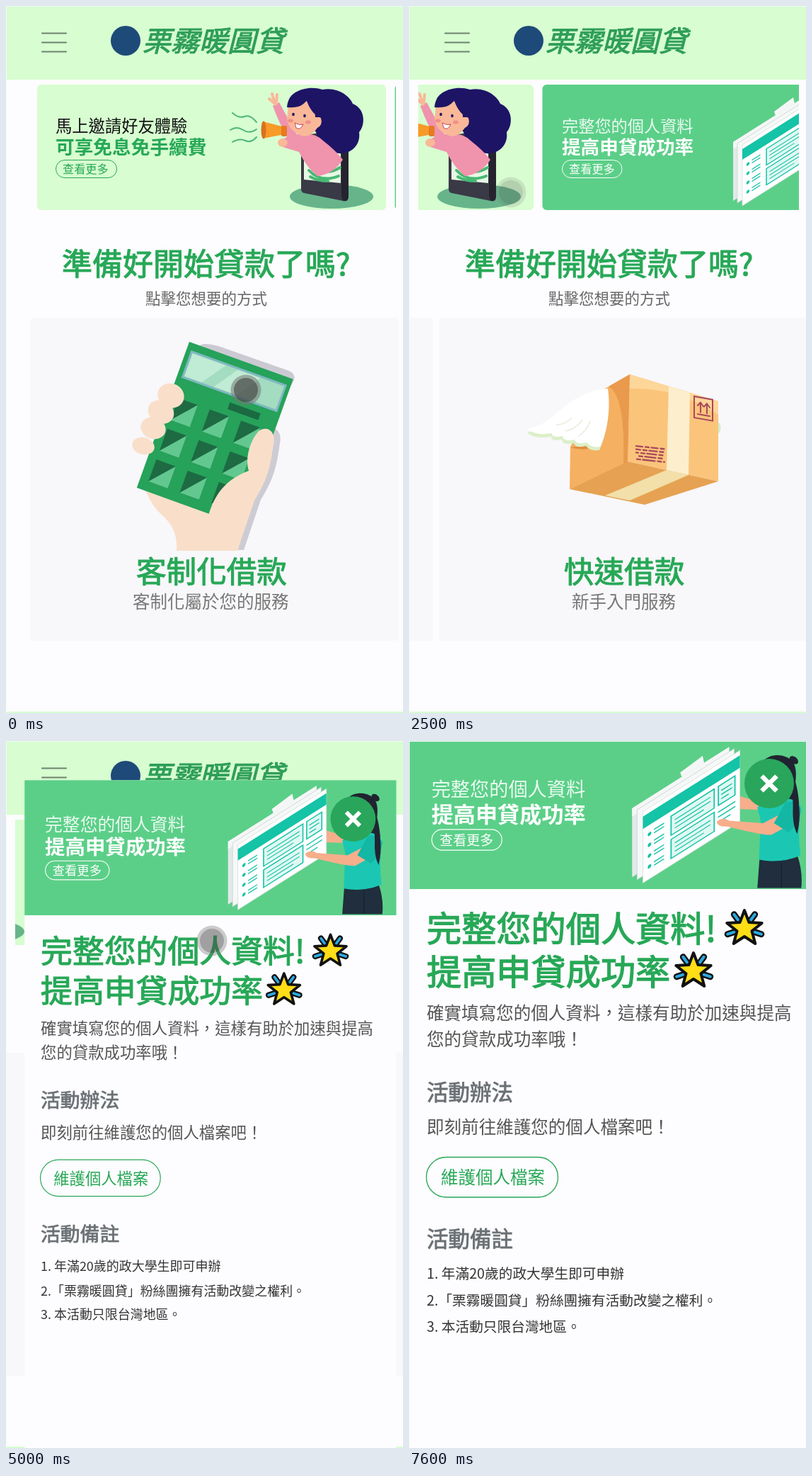
An HTML page that plays this animation: 561 by 998 pixels, repeating every 7700 ms.

```html
<!DOCTYPE html>
<html lang="zh-Hant">
<head>
<meta charset="utf-8">
<style>
html, body { margin: 0; width: 100%; height: 100%; overflow: hidden; background: #fdfcfe; }
svg { display: block; width: 100%; height: 100%; }
text { font-family: "Noto Sans CJK TC", "Noto Sans CJK", "Noto Sans", sans-serif; white-space: pre; }
</style>
</head>
<body>
<svg id="stage" viewBox="0 0 561 998" fill="none"></svg>
<script>
const GREEN = '#27a857', MINT = '#d7fdd0', PAGE = '#fdfcfe', CARD = '#f8f7fa', SKIN = '#f9dfc9';

// Text placed by its left edge and the vertical middle of its em box.
const text = (x, cy, size, str, fill, weight = 400, more = '') =>
  `<text x="${x}" y="${cy + size * 0.38}" font-size="${size}" fill="${fill}" font-weight="${weight}" ${more}>${str}</text>`;
// Medium weight: regular glyphs thickened by a thin outline.
const medium = (x, cy, size, str, fill, more = '') =>
  text(x, cy, size, str, fill, 400, `stroke="${fill}" stroke-width="${size * 0.027}" ${more}`);
const rect = (x, y, w, h, fill, more = '') =>
  `<rect x="${x}" y="${y}" width="${w}" height="${h}" fill="${fill}" ${more}/>`;
const path = (d, fill, more = '') => `<path d="${d}" fill="${fill}" ${more}/>`;
const line = (d, stroke, width, more = '') =>
  `<path d="${d}" stroke="${stroke}" stroke-width="${width}" stroke-linecap="round" stroke-linejoin="round" ${more}/>`;
const oval = (x, y, rx, ry, fill, more = '') =>
  `<ellipse cx="${x}" cy="${y}" rx="${rx}" ry="${ry}" fill="${fill}" ${more}/>`;
const group = (attrs, ...parts) => `<g ${attrs}>${parts.join('')}</g>`;
const repeat = (n, fn) => Array.from({ length: n }, (_, i) => fn(i)).join('');

function inviteBanner() {
  const hair = '#1d1466', face = '#f9b898', pink = '#f093ad';
  return [
    rect(44, 111, 493, 177, MINT, 'rx="6"'),
    text(70, 169, 23.3, '馬上邀請好友體驗', '#111'),
    text(70, 199, 26.7, '可享免息免手續費', GREEN, 700),
    rect(70.5, 217.5, 86, 25, 'none', `rx="12.5" stroke="${GREEN}"`),
    text(80, 230, 16.2, '查看更多', GREEN),
    line('M320 151q9 8 17 5t17 8M317 175q9-6 18 0t19-1M320 192q10-6 18-2t16-5', '#4fb67c', 2),
    oval(460, 269, 59, 17, '#67b48b'),
    path('M417 188Q417 184 421 183L478 172Q484 171 484 178V268Q484 277 476 275L421 264Q417 263 417 258Z', '#3a3946'),
    path('M478 172Q484 171 484 178V268Q484 277 476 275L474 268V176Z', '#25242e'),
    path('M421 190L473 182V250L421 245Z', '#e6f9e4'),
    line('M428 232Q445 250 470 240M432 222Q450 242 472 228M430 241Q440 247 455 247', '#48b873', 4),
    path('M399 138C398 122 425 111 447 118C470 114 486 128 490 138C508 145 508 168 499 178C502 200 482 212 465 207C452 202 442 192 438 178L410 145Z', hair),
    path('M402 182L421 180Q438 180 448 190Q466 204 476 217Q462 238 440 240Q425 228 414 206L391 199L388 190Z', pink),
    path('M377 141L386 136Q395 152 404 170L414 186L402 194Q386 166 377 141Z', pink),
    line('M380 138L372 131M380 137L376 124M382 136L383 125M381 139L379 134', face, 4),
    path('M399 140Q414 143 425 134Q432 153 445 158Q448 168 440 172Q432 184 421 184Q400 178 397 160Z', face),
    path('M397 143Q419 145 425 132Q437 140 437 157L447 157L440 125L414 120Q398 127 397 143Z', hair),
    oval(406, 153, 1.8, 2.2, hair), oval(422, 155, 1.8, 2.2, hair),
    oval(402, 162, 4, 2.5, '#ef8f86'), oval(427, 164, 4, 2.5, '#ef8f86'),
    path('M408 165Q415 169 420 167Q416 176 410 172Z', '#fff', 'stroke="#c8405a"'),
    path('M363 163L394 171V181L363 187Z', '#f79a28'),
    oval(364, 175, 3.5, 12.5, '#d9701e'),
    rect(389, 169, 8, 15, '#e67b20', 'rx="2"'),
    oval(391, 193, 7, 6, face)
  ].join('');
}

function profileArt() {
  const teal = '#15c3a7', skin = '#f6ae8b', dark = '#202431';
  const page = (x, y) => `transform="matrix(1 -.63 0 1 ${x} ${y})"`;
  const frame = `stroke="${teal}" stroke-width="1.5"`;
  return [
    text(84, 169, 23.2, '完整您的個人資料', '#eafaf0', 300),
    text(84, 199, 26.6, '提高申貸成功率', '#fff', 700),
    rect(84.5, 217.5, 84.5, 25, 'none', 'rx="12.5" stroke="#fff"'),
    text(94, 230, 16.2, '查看更多', '#fff'),
    path('M479 150C478 133 495 124 511 130C522 134 525 143 523 160Q531 190 525 223Q514 219 510 193L492 181Z', dark),
    oval(521, 134, 6, 4, dark, 'transform="rotate(40 521 134)"'),
    path('M451 176L475 183L481 194L453 193Z', skin),
    path('M384 149L411 129L413 138L386 155Z', '#f4f7f6'),
    group(page(326, 192), rect(0, 0, 117, 83, '#e3e9e9'), rect(0, 0, 117, 10, '#f4f7f6')),
    group(page(332, 194), rect(0, 0, 117, 84, '#f6f8f8', 'stroke="#c9d5d3" stroke-width=".7"')),
    group(page(339, 196),
      rect(0, 0, 117, 86, '#fff', 'stroke="#d5dfdd" stroke-width=".7"'),
      rect(0, 6, 117, 15, teal),
      repeat(4, i => oval(8, 32 + i * 13, 2.2, 2.2, teal) +
        line(`M14 ${30 + i * 13}h11M14 ${34 + i * 13}h11`, teal, 1.4)),
      repeat(2, i => rect(34, 27 + i * 28, 52, 23, '#dff8f2', frame) +
        line(`M39 ${34 + i * 28}h42M39 ${39 + i * 28}h42M39 ${44 + i * 28}h34`, teal, 1.2)),
      rect(91, 27, 20, 23, '#dff8f2', frame),
      line('M95 34h12M95 39h12M95 44h8M91 58h20M91 64h20M91 70h14', teal, 1.4)),
    path('M477 288L480 248H525Q532 268 530 288Z', '#202e3d'),
    line('M506 258V287', '#14202c', 1),
    path('M477 191Q490 178 510 180Q527 181 530 193Q525 218 529 249Q505 259 479 254L481 207Z', '#1bc7b3'),
    path('M484 164H501L507 181Q497 188 487 182Z', '#e99b79'),
    path('M481 147Q494 148 500 139Q512 145 509 161Q505 176 491 174Q480 170 481 147Z', skin),
    path('M482 147Q497 151 502 139L512 154L508 174L516 180L518 145L500 130Z', dark),
    line('M484 153h3M494 154h4M486 167q4-2 6 0', dark, 1.3),
    oval(497, 162, 3, 2, '#ee8f7d'),
    path('M428 208Q436 202 443 207L484 210L513 195L523 208L494 224Q484 225 441 214Q429 215 428 208Z', skin),
    path('M511 185Q525 181 530 194Q528 209 515 221L497 210Z', '#13b7a4'),
    path('M519 160Q533 190 525 223Q519 212 520 190Z', dark)
  ].join('');
}

function calculatorCard() {
  const thumb = 'M361 600C374 591 386 602 382 618C378 648 374 668 355 698L331 769H246L247 738L290 719C299 690 313 669 347 656C342 641 347 616 361 600Z';
  return [
    rect(34, 440, 521, 456, CARD, 'rx="5"'),
    path('M274 480Q276 474 300 480L400 515Q411 520 406 530L390 560L262 500Z', '#cbcad2'),
    path(thumb, '#cdccd4', 'transform="translate(5 -1)"'),
    path('M197 684Q207 708 224 722Q243 740 241 769H328L340 690L320 650Z', SKIN),
    group('transform="translate(259 474) rotate(19.8)"',
      rect(0, 0, 156, 219, '#26a25a'),
      rect(8, 12, 141, 38, '#a3dcc0', 'stroke="#7fb8c0" stroke-width="3"'),
      path('M10 14H60L36 48H10ZM78 14H112L88 48H54Z', '#c0ebd4'),
      rect(83, 61, 46, 10, '#1b6a42'),
      repeat(9, i => {
        const x = 12.5 + i % 3 * 47, y = 80 + (i / 3 | 0) * 46;
        return rect(x, y, 29, 33, '#1d6a43') + path(`M${x + 29} ${y}v33h-29Z`, '#62c88f');
      })),
    oval(233, 550, 19, 17, SKIN, 'transform="rotate(25 233 550)"'),
    oval(219, 573, 19, 16, SKIN, 'transform="rotate(30 219 573)"'),
    oval(208, 596, 18, 15, SKIN, 'transform="rotate(20 208 596)"'),
    oval(194, 621, 16, 12, SKIN, 'transform="rotate(15 194 621)"'),
    path(thumb, SKIN, 'transform="translate(-4 0)"'),
    medium(184, 798, 42.6, '客制化借款', GREEN),
    text(179, 841, 24.5, '客制化屬於您的服務', '#777', 300)
  ].join('');
}

// Drawn at its resting place after the swipe.
function boxCard() {
  const ink = '#a8485c';
  const wing = 'M281 540C244 543 222 563 203 580Q188 592 168 597Q177 607 202 603Q201 610 217 607Q218 616 234 612Q236 620 251 616Q257 624 270 622C281 600 285 566 281 540Z';
  return [
    rect(42, 440, 521, 456, CARD, 'rx="5"'),
    path('M437 587Q443 592 439 602L436 604Z', '#d3edc8'),
    path('M312 520L272 543L228 622L227 682L309 644Z', '#f5b061'),
    path('M312 520L437 558V671L309 643Z', '#fbc47b'),
    path('M227 682L309 643L437 671L333 704Z', '#e6a252'),
    path('M312 520L437 558V577Q380 538 311 540Z', '#fdd69a'),
    path('M312 520L282 537Q306 550 303 647L309 644Z', '#e99a4c'),
    path('M367 537L397 546L395 662L364 655Z', '#fdefcd'),
    path('M364 655L395 662L312 698L277 691Z', '#f2dfa9'),
    path('M228 623Q262 633 280 606L270 618Z', '#df8c3d'),
    path(wing, '#dcefc9', 'transform="translate(-1 5)"'),
    path(wing, '#fff'),
    line('M208 591Q218 592 230 582M222 600Q236 597 245 584M240 607Q252 598 256 586', '#e5efdc', 1.5),
    group('transform="translate(403 551) skewY(10)"',
      rect(0, 0, 26, 30, 'none', `stroke="${ink}" stroke-width="2"`),
      line('M9 21V8M5 12L9 7L13 12M18 21V8M14 12L18 7L22 12M5 24H22', ink, 2)),
    group('transform="translate(320 621) skewY(6)"',
      repeat(5, i => line(`M1 ${i * 4.6}H41`, ink, 2.3, `stroke-dasharray="${9 + i * 2} 4 5 3.5" stroke-dashoffset="${i * 5}"`))),
    medium(219, 798, 42.6, '快速借款', GREEN),
    text(230, 841, 24.5, '新手入門服務', '#777', 300)
  ].join('');
}

function star(x, y) {
  const polar = (r, deg) => [r * Math.cos(deg * Math.PI / 180), r * Math.sin(deg * Math.PI / 180)].map(v => v.toFixed(1));
  const rays = [-54, 18, 162, 234].map(a => `M${polar(14, a)}L${polar(25, a)}`).join('');
  const body = 'M' + Array.from({ length: 10 }, (_, i) => polar(i % 2 ? 11 : 26, i * 36 - 90)).join('L') + 'Z';
  return group(`transform="translate(${x} ${y})"`,
    line(rays, '#111', 9), line(rays, '#2ba9e0', 4),
    path(body, '#ffdd17', 'stroke="#111" stroke-width="4" stroke-linejoin="round"'));
}

function modal() {
  return [
    rect(0, 0, 576, 1258, PAGE),
    rect(0, 0, 576, 209, '#5bcf88'),
    '<use href="#profile" transform="scale(1.172) translate(-57 -111)"/>',
    oval(509, 60, 35, 35, '#29a65b'),
    line('M498.5 49.5L519.5 70.5M519.5 49.5L498.5 70.5', '#fff', 6.5, 'style="stroke-linecap:butt"'),
    medium(25, 264, 49.2, '完整您的個人資料!', GREEN), star(474, 265),
    medium(25, 325, 49.2, '提高申貸成功率', GREEN), star(402, 325),
    text(25, 384, 24.55, '確實填寫您的個人資料，這樣有助於加速與提高', '#555', 300),
    text(25, 421, 24.55, '您的貸款成功率哦！', '#555', 300),
    medium(25, 495, 30.5, '活動辦法', '#6a7074'),
    text(25, 545, 24.55, '即刻前往維護您的個人檔案吧！', '#555', 300),
    rect(24.5, 587.5, 186, 56.5, 'none', `rx="28" stroke="${GREEN}" stroke-width="1.3"`),
    text(45, 616, 24.5, '維護個人檔案', GREEN),
    medium(25, 702, 30.5, '活動備註', '#6a7074'),
    text(25, 752, 19.7, '1. 年滿20歲的政大學生即可申辦', '#333'),
    text(25, 790, 19.7, '2.「栗霧暖圓貸」粉絲團擁有活動改變之權利。', '#333'),
    text(25, 827, 19.7, '3. 本活動只限台灣地區。', '#333')
  ].join('');
}

const stage = document.getElementById('stage');
stage.innerHTML = [
  `<defs><clipPath id="strip">${rect(13, 104, 538, 190, '#000')}</clipPath>`,
  group('id="profile"', profileArt()), '</defs>',
  rect(0, 0, 561, 998, PAGE),
  rect(0, 0, 561, 104, MINT),
  rect(0, 996, 561, 2, MINT),
  line('M51 38.5H85M51 51.5H85M51 64.5H85', '#6f8370', 2.2),
  oval(169, 49, 21, 21, '#1d4a78'),
  medium(193, 49, 40, '栗霧暖圓貸', '#2f9e58', 'font-style="italic"'),
  group('clip-path="url(#strip)"', group('id="banners"',
    inviteBanner(),
    group('transform="translate(493 0)"', rect(56.5, 111, 492.5, 177, '#5bcf88', 'rx="6"'), '<use href="#profile"/>'))),
  medium(79, 364, 43, '準備好開始貸款了嗎?', GREEN),
  text(197, 413, 21.5, '點擊您想要的方式', '#666', 300),
  group('id="cards"', calculatorCard(), group('transform="translate(521 0)"', boxCard())),
  group('id="modal"', modal()),
  group('id="touch"',
    oval(0, 0, 21.5, 21.5, '#777', 'fill-opacity=".55"'),
    oval(0, 0, 17, 17, '#333', 'fill-opacity=".5"')),
  path('M0 0H561V1H1V998H0Z', '#f2fbf3')
].join('');

const el = id => document.getElementById(id);
const banners = el('banners'), cards = el('cards'), sheet = el('modal'), touch = el('touch');
const ramp = (t, a, b) => Math.min(1, Math.max(0, (t - a) / (b - a)));
const easeOut = p => 1 - (1 - p) ** 3;
const smooth = p => p * p * (3 - 2 * p);
const fade = (t, from, to, length = 150) => ramp(t, from - 100, from) * (1 - ramp(t, to, to + length));

// Content follows the finger, then glides to its snap point.
function swipe(t, start, release, end, drag, snap) {
  const finger = drag * smooth(ramp(t, start, release));
  return { finger, shift: finger + (snap - drag) * easeOut(ramp(t, release, end)) };
}

function draw(t) {
  const card = swipe(t, 50, 450, 950, -225, -521);
  const banner = swipe(t, 2030, 2400, 2850, -210, -493);
  cards.setAttribute('transform', `translate(${card.shift} 0)`);
  banners.setAttribute('transform', `translate(${banner.shift} 0)`);

  const scale = 0.7 + 0.3 * easeOut(ramp(t, 4850, 5300));
  sheet.setAttribute('transform', `translate(298 629) scale(${scale}) translate(-298 -629)`);
  sheet.setAttribute('opacity', ramp(t, 4850, 4980));

  const [x, y, alpha] =
    t < 1500 ? [339 + card.finger, 542, fade(t, 0, 450)] :
    t < 3500 ? [354 + banner.finger, 263, fade(t, 1950, 2400)] :
    [291, 282, fade(t, 4350, 4900, 300)];
  touch.setAttribute('transform', `translate(${x} ${y})`);
  touch.setAttribute('opacity', alpha);
}

const began = performance.now();
function tick() {
  draw((performance.now() - began) % 7700);
  requestAnimationFrame(tick);
}
tick();
</script>
</body>
</html>
```
